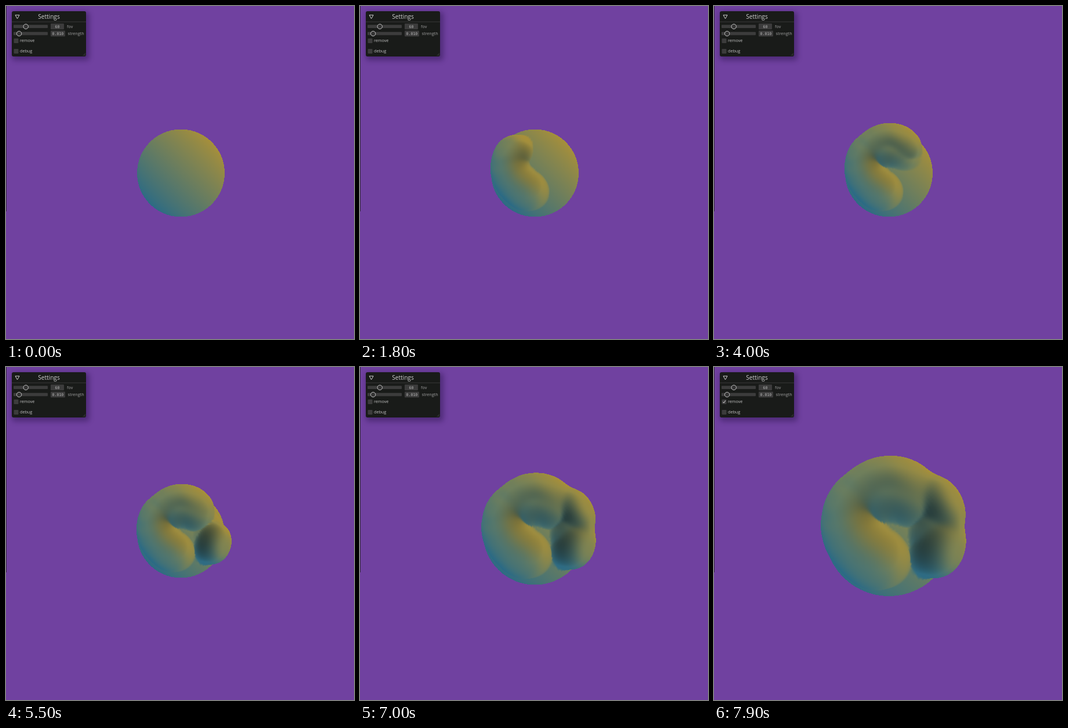
An HTML page with a canvas that plays this animation: 600 px wide and 574 px high, repeating every 8000 ms.

```html
<!DOCTYPE html>
<html lang="en">
<head>
<meta charset="utf-8">
<title>Sculpting</title>
<style>
  html, body { margin: 0; width: 100%; height: 100%; overflow: hidden; background: #7041a0; }
  #edge { position: absolute; left: 0; top: 0; width: 1px; height: 354px; background: #33263f; }
  canvas { position: absolute; left: 170px; top: 145px; }
  #panel {
    position: absolute; left: 10px; top: 9px; width: 128px; height: 78px; border-radius: 3px;
    background: #191b19; box-shadow: 3px 4px 9px 3px rgba(25, 8, 55, .36);
  }
  svg { position: absolute; left: 0; top: 0; }
  text { font: 7.2px "Open Sans", "Noto Sans", sans-serif; fill: #a0a0a0; }
  .title { font-size: 10.1px; fill: #cfcfcf; }
  .num { font: 6.6px "DejaVu Sans Mono", monospace; fill: #b4b4b4; }
  .box { fill: #3c3c3c; }
  .knob { fill: #343434; stroke: #c4c4c4; }
  .check text { fill: #c0c0c0; }
  .check path { fill: none; stroke: #d8d8d8; visibility: hidden; }
  .check.on path { visibility: visible; }
  .check.hover .box { fill: #4b4853; stroke: #b0b0b0; stroke-width: 1; }
  .check.hover text { fill: #f4f4f4; }
</style>
</head>
<body>
<div id="edge"></div>
<canvas id="view" width="270" height="260"></canvas>
<div id="panel"></div>
<svg width="160" height="110" viewBox="0 0 160 110">
  <path d="M16 15.7h7l-3.5 6.2z" fill="none" stroke="#cfcfcf"/>
  <text class="title" x="74" y="22.4" text-anchor="middle">Settings</text>
  <path d="M10 27.3h128" stroke="#3c3c3c" stroke-width=".9"/>
  <g class="box">
    <rect x="13" y="32.6" width="59" height="5.4" rx="1"/>
    <rect x="13" y="44.8" width="59" height="5.4" rx="1"/>
    <rect x="77" y="30.3" width="23" height="10" rx="1"/>
    <rect x="77" y="42.6" width="25" height="10" rx="1"/>
  </g>
  <circle class="knob" cx="34.2" cy="35.4" r="4.2"/>
  <circle class="knob" cx="22.6" cy="47.6" r="4.2"/>
  <text class="num" x="88.5" y="37.8" text-anchor="middle">60</text>
  <text class="num" x="89.4" y="50.1" text-anchor="middle">0.010</text>
  <text x="105" y="37.8">fov</text>
  <text x="106.5" y="50.1">strength</text>
  <g class="check" id="remove">
    <rect class="box" x="13.5" y="56" width="8" height="8" rx="1"/>
    <path d="M15.3 60l1.7 2 2.9-4.3"/>
    <text x="24" y="62.3">remove</text>
  </g>
  <g class="check" id="debug">
    <rect class="box" x="13.5" y="74" width="8" height="8" rx="1"/>
    <text x="24" y="80.3">debug</text>
  </g>
  <path d="M133 85.5l4-4M135.4 85.5l1.6-1.6" stroke="#555" stroke-width=".7"/>
</svg>
<script>
const LOOP = 8000, STEP = 100;
const W = 270, H = 260, LEFT = 170, TOP = 145;
const FOCAL = 497, RADIUS = .53, RAMP = 400;
const ROWS = 64, COLS = 128, MAX_ANGLE = 2.1;
const BLUE = [28, 102, 142], YELLOW = [166, 143, 58];

// Brush dabs on the unit sphere: x, y, start in ms, height
const dabs = [
  [-.23, .40, 250, .18], [-.36, .29, 500, .18], [-.49, .15, 750, .18],
  [-.57, -.02, 950, .18], [-.59, -.20, 1150, .18], [-.53, -.42, 1350, .19],
  [-.38, -.56, 1900, .18], [-.20, -.69, 2250, .20], [-.02, -.73, 2650, .21],
  [.15, -.71, 3050, .21], [.28, -.65, 3300, .20],
  [-.10, -.58, 3500, .18], [.10, -.58, 3650, .18], [.27, -.54, 3800, .18],
  [.71, .20, 4500, .26],
  [.70, .02, 5400, .17], [.71, -.15, 5600, .17],
  [.70, -.34, 5800, .27], [.62, -.45, 6100, .20]
].map(([x, y, start, height]) =>
  ({ x, y, z: Math.sqrt(1 - x * x - y * y), start, height }));

const ctx = document.getElementById("view").getContext("2d");
const image = ctx.createImageData(W, H);
const depth = new Float32Array(W * H);
const removeBox = document.getElementById("remove");
const debugBox = document.getElementById("debug");

const clamp = v => Math.max(0, Math.min(1, v));

const dirs = [];
for (let i = 0; i <= ROWS; i++) {
  const a = i / ROWS * MAX_ANGLE;
  for (let j = 0; j < COLS; j++) {
    const b = j / COLS * 2 * Math.PI;
    dirs.push([Math.sin(a) * Math.cos(b), Math.sin(a) * Math.sin(b), Math.cos(a)]);
  }
}

// Each dab is a plateau; their smooth maximum gives height and gradient.
function vertex([x, y, z], active, cam) {
  let sum = 0, gx = 0, gy = 0, gz = 0;
  for (const d of active) {
    const dx = x - d.x, dy = y - d.y, dz = z - d.z;
    const q2 = (dx * dx + dy * dy + dz * dz) / (RADIUS * RADIUS);
    if (q2 >= 1) continue;
    const f = 1 - q2 * q2, h = d.amp * f * f;
    const s = -8 * d.amp * f * q2 / (RADIUS * RADIUS) * h ** 5;
    sum += h ** 6;
    gx += s * dx; gy += s * dy; gz += s * dz;
  }
  const h = sum ** (1 / 6), r = 1 + h;
  if (h > 1e-4) {
    const k = h ** -5;
    gx *= k; gy *= k; gz *= k;
    const radial = gx * x + gy * y + gz * z;
    gx -= radial * x; gy -= radial * y; gz -= radial * z;
  } else gx = gy = gz = 0;

  const bump = 2;
  const nx = x * r - bump * gx, ny = y * r - bump * gy, nz = z * r - bump * gz;
  const lit = clamp(.56 + .46 * .707 * (nx - ny) / Math.hypot(nx, ny, nz));
  const shade = 1 - Math.min(.45, Math.max(0, -gz));
  const p = FOCAL / (cam.dist - z * r);
  return {
    x: cam.x + x * r * p - LEFT, y: cam.y + y * r * p - TOP, p,
    c: BLUE.map((v, i) => (v + (YELLOW[i] - v) * lit) * shade)
  };
}

function triangle(a, b, c) {
  const area = (b.x - a.x) * (c.y - a.y) - (b.y - a.y) * (c.x - a.x);
  if (area <= 0) return;
  const x0 = Math.max(0, Math.ceil(Math.min(a.x, b.x, c.x)));
  const x1 = Math.min(W - 1, Math.floor(Math.max(a.x, b.x, c.x)));
  const y0 = Math.max(0, Math.ceil(Math.min(a.y, b.y, c.y)));
  const y1 = Math.min(H - 1, Math.floor(Math.max(a.y, b.y, c.y)));
  for (let y = y0; y <= y1; y++) {
    for (let x = x0; x <= x1; x++) {
      const u = ((b.x - x) * (c.y - y) - (b.y - y) * (c.x - x)) / area;
      const v = ((c.x - x) * (a.y - y) - (c.y - y) * (a.x - x)) / area;
      const w = 1 - u - v;
      if (u < -1e-6 || v < -1e-6 || w < -1e-6) continue;
      const p = u * a.p + v * b.p + w * c.p, at = y * W + x;
      if (p <= depth[at]) continue;
      depth[at] = p;
      for (let i = 0; i < 3; i++) image.data[at * 4 + i] = u * a.c[i] + v * b.c[i] + w * c.c[i];
      image.data[at * 4 + 3] = 255;
    }
  }
}

function draw(t) {
  const zoom = 1 - (1 - clamp((t - 6800) / 700)) ** 2;
  const cam = { dist: 6.66 - 2.07 * zoom, x: 301, y: 287.5 - 4 * zoom };
  const active = dabs.filter(d => t > d.start);
  for (const d of active) d.amp = d.height * clamp((t - d.start) / RAMP);

  image.data.fill(0);
  depth.fill(0);
  const verts = dirs.map(d => vertex(d, active, cam));
  for (let i = 0; i < ROWS; i++) {
    for (let j = 0; j < COLS; j++) {
      const k = (j + 1) % COLS, n = i * COLS, m = n + COLS;
      triangle(verts[n + j], verts[m + j], verts[m + k]);
      triangle(verts[n + j], verts[m + k], verts[n + k]);
    }
  }
  ctx.putImageData(image, 0, 0);

  debugBox.classList.toggle("hover", t >= 7100 && t < 7400);
  removeBox.classList.toggle("hover", t >= 7400 && t < 7900);
  removeBox.classList.toggle("on", t >= 7800);
}

let shown = -1;
function tick() {
  const t = Math.floor(performance.now() % LOOP / STEP) * STEP;
  if (t !== shown) draw(shown = t);
  requestAnimationFrame(tick);
}
tick();
</script>
</body>
</html>
```
